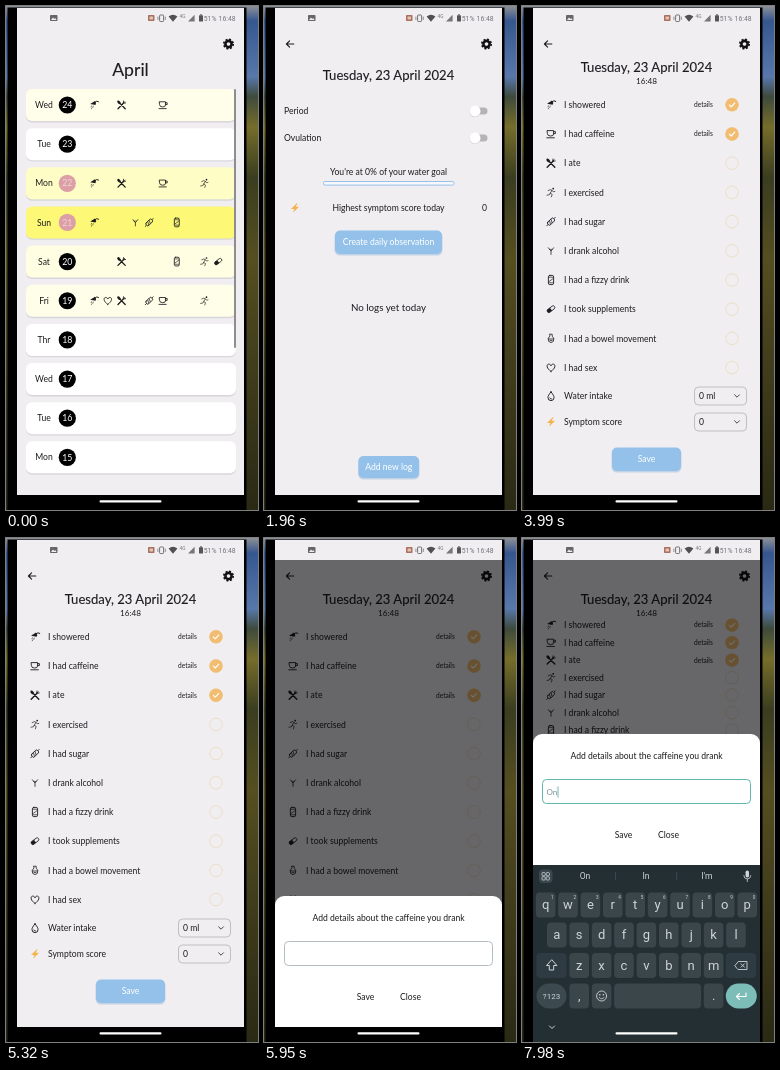
These frames come from a looping animation (252x504 px, 8000 ms). An HTML page:

```html
<!DOCTYPE html>
<html lang="en">
<head>
<meta charset="utf-8">
<title>Daily log</title>
<style>
@property --shrink { syntax: "<length>"; inherits: true; initial-value: 0px; }
html, body { margin: 0; width: 100%; height: 100%; overflow: hidden; background: #000; }
svg { display: block; width: 100vw; height: 100vh; }
text { font-family: Lato, sans-serif; fill: #1c1c1f; }
text.title { stroke: #1c1c1f; stroke-width: .12px; }
text.light { fill: #fff; }
text.key { font-family: Roboto, sans-serif; fill: #cfd5d8; }
text.status { font-family: Roboto, sans-serif; fill: #77757a; }
text.typed { fill: #7d9090; }
.line { fill: none; stroke: #1c1c1f; stroke-linecap: round; stroke-linejoin: round; }

.page { transform-origin: 124.5px 245.5px; }
#calendar, #day, #day-in, #log, #log-page, #dim, #sheet, #keyboard, #keys, #bar, #row-press, #add-press,
#focus, #caret, #typed-o, #typed-n, #words, #upper, #lower, .tick { animation: 8s linear infinite both; }
#calendar { animation-name: calendar; }
#bar { animation-name: bar; }
#row-press { animation-name: row-press; }
#day { animation-name: day-out; }
#day-in { animation-name: day-in; }
#log { animation-name: log-in; }
#add-press { animation-name: add-press; }
#log-page { animation-name: shrink; }
#dim { animation-name: dim; }
#sheet { animation-name: rise, shrink; }
#sheet > g { transform: translateY(calc(358px - var(--shrink))); }
#keyboard { animation-name: keyboard; }
#keys { animation-name: keys; }
#focus { animation-name: focus; }
#caret { animation-name: caret; animation-timing-function: step-end; }
#typed-o, #words, #lower { animation-name: first-letter; animation-timing-function: step-end; }
#upper { animation-name: upper; animation-timing-function: step-end; }
#typed-n { animation-name: second-letter; animation-timing-function: step-end; }
.row { transform: translateY(calc(69.6px + var(--i) * (29.2px - var(--shrink) * .0722))); }
#tick1 { animation-name: tick1; }
#tick2 { animation-name: tick2; }
#tick3 { animation-name: tick3; }

@keyframes bar { 0%, .8% { opacity: 1; } 4.4%, 100% { opacity: 0; } }
@keyframes row-press { 0%, 6% { opacity: 0; } 7.5% { opacity: .08; } 9.5%, 100% { opacity: 0; } }
@keyframes calendar {
  0%, 7.9% { transform: scale(1); animation-timing-function: ease-out; }
  10.5% { transform: scale(1.13); animation-timing-function: ease-out; }
  14%, 100% { transform: scale(1.15); }
}
@keyframes day-in {
  0%, 7.9% { transform: scale(.85); opacity: 0; animation-timing-function: ease-out; }
  9.6% { transform: scale(.97); opacity: 0; }
  10.5% { transform: scale(.985); opacity: .18; }
  12% { transform: scale(.997); opacity: 1; }
  13%, 100% { transform: scale(1); opacity: 1; }
}
@keyframes add-press { 0%, 26.5% { opacity: 0; } 27.6% { opacity: .12; } 30%, 100% { opacity: 0; } }
@keyframes day-out {
  0%, 27.8% { transform: scale(1); animation-timing-function: ease-out; }
  30%, 100% { transform: scale(1.14); }
}
@keyframes log-in {
  0%, 27.8% { transform: scale(.85); opacity: 0; animation-timing-function: ease-out; }
  29% { transform: scale(.97); opacity: 0; }
  30% { transform: scale(.988); opacity: .3; }
  31% { transform: scale(.998); opacity: 1; }
  31.6%, 100% { transform: scale(1); opacity: 1; }
}
@keyframes tick1 { 0%, 38.4% { opacity: 0; } 40.5%, 100% { opacity: 1; } }
@keyframes tick2 { 0%, 45.4% { opacity: 0; } 47.5%, 100% { opacity: 1; } }
@keyframes tick3 { 0%, 61.2% { opacity: 0; } 63.3%, 100% { opacity: 1; } }
@keyframes dim { 0%, 68.2% { opacity: 0; } 69.12% { opacity: .43; } 71%, 100% { opacity: .57; } }
@keyframes rise {
  0%, 68.25% { transform: translateY(131px); }
  69.12% { transform: translateY(122.5px); }
  70% { transform: translateY(72px); }
  70.9% { transform: translateY(28px); }
  71.8% { transform: translateY(7px); }
  72.6%, 100% { transform: translateY(0); }
}
@keyframes focus { 0%, 83% { stroke: #b4bcc4; } 85.75% { stroke: #8fa9c0; } 89%, 100% { stroke: #62b5ae; } }
@keyframes shrink {
  0%, 84.8% { --shrink: 0px; }
  85.75% { --shrink: 24px; }
  86.6% { --shrink: 105px; }
  87.5% { --shrink: 152px; }
  88.3%, 100% { --shrink: 162px; }
}
@keyframes keyboard {
  0%, 83.9% { transform: translateY(177px); }
  85.75% { transform: translateY(150px); }
  86.6% { transform: translateY(60px); }
  87.5% { transform: translateY(12px); }
  88.3%, 100% { transform: translateY(0); }
}
@keyframes keys { 0%, 85.8% { opacity: 0; } 86.6%, 100% { opacity: 1; } }
@keyframes caret {
  0% { opacity: 0; transform: none; }
  88.4% { opacity: 1; transform: none; }
  92.8% { opacity: 1; transform: translateX(6.3px); }
  98%, 100% { opacity: 1; transform: translateX(10.6px); }
}
@keyframes first-letter { 0% { opacity: 0; } 92.8%, 100% { opacity: 1; } }
@keyframes upper { 0% { opacity: 1; } 92.8%, 100% { opacity: 0; } }
@keyframes second-letter { 0% { opacity: 0; } 98%, 100% { opacity: 1; } }
</style>
</head>
<body>
<svg id="stage" viewBox="0 0 252 504" preserveAspectRatio="none"></svg>
<script>
const PAGE = '#f0eef1';
const BLUE = '#93c1ea';

const text = (x, y, value, { size = 8.6, anchor = 'start', cls = '', extra = '' } = {}) =>
  `<text x="${x}" y="${y + size * .36}" font-size="${size}" text-anchor="${anchor}" class="${cls}" ${extra}>${value}</text>`;
const middle = (x, y, value, options = {}) => text(x, y, value, { ...options, anchor: 'middle' });
const box = (x, y, w, h, r, fill, extra = '') =>
  `<rect x="${x}" y="${y}" width="${w}" height="${h}" rx="${r}" fill="${fill}" ${extra}/>`;
const disc = (x, y, r, fill, extra = '') => `<circle cx="${x}" cy="${y}" r="${r}" fill="${fill}" ${extra}/>`;
const line = (d, width = .8, extra = '') => `<path class="line" d="${d}" stroke-width="${width}" ${extra}/>`;
const solid = (d, fill = '#1c1c1f') => `<path d="${d}" fill="${fill}"/>`;
const at = (x, y, content, scale = 1) => `<g transform="translate(${x} ${y}) scale(${scale})">${content}</g>`;
const times = (n, fn) => Array.from({ length: n }, (_, i) => fn(i)).join('');

// Each icon is drawn around the origin, about ten pixels across.
const icons = {
  shower: solid('M-4-1L1-4.2Q3-2 1.6 0Z') + line('M1-3Q3-5 4.8-3.5', 1) + line('M-2.6 1L-3 2M-.8 1.2L-1.2 2.6M-2.4 3.2L-2.7 4', .6),
  heart: line('M0 3.8C-6-.2-4-4.2-1.6-3.4Q-.4-3 0-1.8Q.4-3 1.6-3.4C4-4.2 6-.2 0 3.8Z', .9),
  food: line('M-3.8 4L2.2-2.2M3.8 4L-2.2-2.2', 1.4) + line('M2-4.2L1.8-2L4.2-2.2M3.2-3.4L1.8-2', .9) +
    '<ellipse cx="-2.8" cy="-2.8" rx="1.4" ry="2.2" transform="rotate(-45 -2.8 -2.8)" fill="#1c1c1f"/>',
  alcohol: line('M-2.6-3L0 .2L2.6-3M0 .2V3.6', .8) + line('M-1.4-1.4H1', .6),
  sugar: `<g transform="rotate(-45)">${box(-4, -1.9, 8, 3.8, 1.4, 'none', 'class="line" stroke-width=".9"')}${line('M-2.2 1.4L-.6-1.4M0 1.4L1.6-1.4', .7)}</g>` +
    line('M-4.2 4.2L-3 3M4.2-4.2L3-3', .9),
  caffeine: line('M-3.6-3.4H2.6V0Q2.6 2-.4 2Q-3.6 2-3.6 0ZM2.6-2.4H4.4V-.4H2.6M-4.2 3.8H3.4', .9),
  fizzy: box(-2.6, -4.6, 5.2, 9.2, 1.4, 'none', 'class="line" stroke-width=".9"') + line('M-2-2.8H2M-2 2.8H2M-1.8 1.4L1.8-1.2', .7),
  exercise: disc(2.2, -3.8, .9, '#1c1c1f') + line('M-2.8-1.8L-.6-2.8L1-2L-.8.8L1.2 2L.4 4.4M-.8.8L-1.6 2.4L-4 2.8M1-2L2.2-.6L3.8-1', .7),
  supplement: `<g transform="rotate(-38)">${box(-4.4, -1.7, 8.8, 3.4, 1.7, 'none', 'class="line" stroke-width=".8"')}${solid('M0-1.7H-2.7A1.7 1.7 0 0 0-2.7 1.7H0Z')}</g>`,
  bowel: line('M-1.2-4.2H1.2V-2.2L2.8 0Q3.4 3.8 0 4.2Q-3.4 3.8-2.8 0L-1.2-2.2ZM-2.6.6H2.6M-1 2.2H1', .8),
  drop: line('M0-4.2Q3.4 0 3 1.6A3 3 0 0 1-3 1.6Q-3.4 0 0-4.2ZM-1.2 2Q-.8 3 .4 3', .95),
  bolt: solid('M1.8-4.8L-4 1H-.6L-2 4.8L4-1.2H.6L2.6-4.8Z', '#f4b24c'),
  gear: disc(0, 0, 3.1, 'none', 'stroke="#111" stroke-width="2.6"') +
    disc(0, 0, 4.7, 'none', 'stroke="#111" stroke-width="1.6" stroke-dasharray="2 1.69"'),
  back: line('M3.8 0H-3.6M-.4-3.2L-3.6 0L-.4 3.2', 1.1),
};

const header = back => (back ? at(26, 38, icons.back) : '') + at(222.5, 38, icons.gear);
const pageBack = box(11, 2, 227, 487, 0, PAGE);
const button = (x, y, w, h, label) => box(x - .5, y + .5, w + 1, h + 1, 5.5, '#c3d3e6') +
  box(x, y, w, h, 5, BLUE) + middle(x + w / 2, y + h / 2, label, { cls: 'light' });

function calendar() {
  const columns = ['shower', 'heart', 'food', 'alcohol', 'sugar', 'caffeine', 'fizzy', 'bowel', 'exercise', 'supplement'];
  const days = [
    ['Wed', '#fffeea', 'shower food caffeine'],
    ['Tue', '#fff', ''],
    ['Mon', '#fffdc6', 'shower food caffeine exercise', true],
    ['Sun', '#fdf977', 'shower alcohol sugar fizzy', true],
    ['Sat', '#fffee2', 'food fizzy exercise supplement'],
    ['Fri', '#fffee8', 'shower heart food sugar caffeine exercise'],
    ['Thr', '#fff', ''], ['Wed', '#fff', ''], ['Tue', '#fff', ''], ['Mon', '#fff', ''],
  ];
  const rows = days.map(([name, fill, marks, period], i) => {
    const y = 99 + i * 39.15;
    return box(20, y - 15, 210, 32.4, 6, '#d8d6da') + box(20, y - 16, 210, 32, 6, fill) +
      middle(38, y, name) + disc(61.3, y, 8.6, period ? '#dc9fa5' : '#000') +
      middle(61.3, y, 24 - i, { cls: 'light', size: 8.8, extra: period ? 'fill-opacity=".55"' : '' }) +
      marks.split(' ').filter(Boolean).map(m => at(88 + columns.indexOf(m) * 13.8, y, icons[m], .95)).join('');
  }).join('');
  return `<g id="calendar" class="page">${pageBack}${header(false)}${middle(124.5, 64, 'April', { size: 17.6, cls: 'title' })}${rows}
    ${box(20, 122, 210, 32, 6, '#000', 'id="row-press"')}${box(228, 83, 2, 259, 1, '#8e8e90', 'id="bar"')}</g>`;
}

function day() {
  const toggle = y => box(207, y - 3.6, 16.5, 7.2, 3.6, '#b5b3b6') +
    disc(211, y + .5, 5.6, '#d2d0d3') + disc(211, y, 5.4, '#fff');
  return `<g id="day" class="page"><g id="day-in" class="page">${pageBack}${header(true)}
    ${middle(124.5, 69.5, 'Tuesday, 23 April 2024', { size: 13.1, cls: 'title' })}
    ${text(20, 105, 'Period')}${toggle(105)}${text(20, 132, 'Ovulation')}${toggle(132)}
    ${middle(124.5, 166, "You're at 0% of your water goal")}
    ${box(59.5, 175.5, 130.5, 3.6, 1.5, '#f7f8fc', 'stroke="#8fbbe6" stroke-width=".9"')}
    ${at(31, 202, icons.bolt)}${middle(124.5, 202, 'Highest symptom score today')}${middle(220.5, 202, '0')}
    ${button(71, 224.5, 107, 23.5, 'Create daily observation')}
    ${middle(124.5, 301, 'No logs yet today', { size: 9.8 })}
    ${button(94.5, 450, 60.5, 22, 'Add new log')}${box(94.5, 450, 60.5, 22, 5, '#000', 'id="add-press"')}</g></g>`;
}

function log() {
  const entries = [
    ['shower', 'I showered'], ['caffeine', 'I had caffeine'], ['food', 'I ate'], ['exercise', 'I exercised'],
    ['sugar', 'I had sugar'], ['alcohol', 'I drank alcohol'], ['fizzy', 'I had a fizzy drink'],
    ['supplement', 'I took supplements'], ['bowel', 'I had a bowel movement'], ['heart', 'I had sex'],
  ];
  const tick = n => `<g id="tick${n}" class="tick">${text(172, 0, 'details', { size: 6.6 })}${disc(210, 0, 6.7, '#f3bd71')}
    ${line('M207.4.2L209.2 2L212.8-1.8', 1.1, 'style="stroke:#fff"')}</g>`;
  const rows = entries.map(([icon, label], i) => `<g class="row" style="--i:${i + 1}">${at(29, 0, icons[icon])}${text(42, 0, label)}
    ${disc(210, 0, 6.3, 'none', 'stroke="#e9dbbd" stroke-width=".8"')}${i < 3 ? tick(i + 1) : ''}</g>`).join('');
  const select = (y, icon, label, value) => at(29, y, icons[icon]) + text(42, y, label) +
    box(172.5, y - 9, 52, 18, 4, 'none', 'stroke="#b3b1b5" stroke-width=".8"') + text(177, y, value) +
    line(`M212.6 ${y - 1.2}L215 ${y + 1.2}L217.4 ${y - 1.2}`, .8);
  return `<g id="log" class="page"><g id="log-page">${pageBack}${header(true)}
    ${middle(124.5, 61, 'Tuesday, 23 April 2024', { size: 13.1, cls: 'title' })}${middle(124.5, 75, '16:48', { size: 8.2 })}
    ${rows}${select(390, 'drop', 'Water intake', '0 ml')}${select(416, 'bolt', 'Symptom score', '0')}
    ${button(90, 441.5, 69, 23.5, 'Save')}</g></g>`;
}

const sheet = () => `${box(11, 22, 227, 467, 0, '#000', 'id="dim"')}
  <g id="sheet"><g>${box(11, 0, 227, 330, 9, '#fff')}
  ${middle(124.5, 22, 'Add details about the caffeine you drank')}
  ${box(20.5, 45.5, 208, 24, 4, '#fff', 'id="focus" stroke-width="1"')}
  ${text(24.5, 58, 'O', { size: 8, cls: 'typed', extra: 'id="typed-o"' })}
  ${text(30.7, 58, 'n', { size: 8, cls: 'typed', extra: 'id="typed-n"' })}
  ${box(24.8, 52.5, .9, 11, 0, '#4fa9a4', 'id="caret"')}
  ${middle(101.5, 101, 'Save')}${middle(146.5, 101, 'Close')}</g></g>`;

function keyboard() {
  const pale = 'style="stroke:#cfd5d8"';
  const rows = [['qwertyuiop', 23.6, 367], ['asdfghjkl', 34.8, 397], ['zxcvbnm', 57.2, 427.5]];
  const each = fn => rows.map(([letters, x, y]) => [...letters].map((c, i) => fn(c, x + i * 22.4, y, i)).join('')).join('');
  const cap = (x, y, w, fill = '#3b464b', r = 4) => box(x - w / 2, y - 12.5, w, 25, r, fill);
  const letter = (c, x, y) => middle(x, y - .5, c, { cls: 'key', size: 13 });
  const digits = times(10, i => middle(30.4 + i * 22.4, 359, (i + 1) % 10, { cls: 'key', size: 4.6 }));
  return `<g id="keyboard">${box(11, 327, 227, 177, 0, '#242f34')}<g id="keys">
    ${box(17, 331.5, 13.5, 13.5, 4, '#3a474e')}
    ${times(4, i => box(20 + i % 2 * 4.2, 334.6 + (i >> 1) * 4.2, 3.2, 3.2, .8, 'none', 'stroke="#cfd5d8" stroke-width=".8"'))}
    <g id="words">${['On', 'In', "I'm"].map((w, i) => middle(63 + i * 61, 338, w, { cls: 'key', size: 8.6 })).join('')}
    ${box(93, 334, .6, 8, 0, '#4b585f')}${box(154.5, 334, .6, 8, 0, '#4b585f')}</g>
    ${box(223.6, 332.5, 3.4, 7, 1.7, '#cfd5d8')}${line('M221.8 337.5Q222 341 225.3 341Q228.6 341 228.8 337.5M225.3 341V343.6', .8, pale)}
    ${each((c, x, y) => cap(x, y, 19.6))}${digits}
    <g id="upper">${each((c, x, y) => letter(c.toUpperCase(), x, y))}</g><g id="lower">${each(letter)}</g>
    ${cap(29.5, 427.5, 30, '#2f3b42')}${line('M29.5 422L24.5 427.5H27.3V432H31.7V427.5H34.5Z', 1, pale)}
    ${cap(219, 427.5, 30, '#2f3b42')}${line('M213 427.5L216.4 423.5H225V431.5H216.4ZM219 425.8L222.4 429.2M222.4 425.8L219 429.2', .9, pale)}
    ${cap(29.5, 458, 30, '#3c4a50', 12.5)}${middle(29.5, 458, '?123', { cls: 'key', size: 8 })}
    ${cap(57.2, 458, 19.6)}${letter(',', 57.2, 458)}
    ${cap(79.6, 458, 19.6)}${disc(79.6, 458, 5, 'none', 'stroke="#cfd5d8" stroke-width=".9"')}
    ${disc(77.8, 456.8, .8, '#cfd5d8')}${disc(81.4, 456.8, .8, '#cfd5d8')}${line('M77.2 459.5Q79.6 462.4 82 459.5', .8, pale)}
    ${cap(135.6, 458, 87)}${cap(191.6, 458, 19.6)}${letter('.', 191.6, 458)}
    ${cap(219.3, 458, 31, '#7dbdb8', 12.5)}${line('M224 455V458.5H214.5M217.5 455.5L214.5 458.5L217.5 461.5', 1.1, 'style="stroke:#fff"')}
    ${line('M27.5 488L30 490.5L32.5 488', 1, pale)}</g></g>`;
}

const statusBar = () => `${box(44, 9, 7.5, 6, .8, '#666')}${solid('M45 14L47 11.4L48.4 13L49.2 12L50.6 14Z', PAGE)}
  ${box(142, 9, 6.5, 6, .8, '#a8705f')}${box(143.5, 10.6, 3.5, 2.8, .4, '#e6c4b4')}
  ${box(153.6, 9, 4, 6.5, .8, 'none', 'stroke="#666" stroke-width=".9"')}${line('M151.9 11V13.6M159.3 11V13.6', .7, 'style="stroke:#666"')}
  ${solid('M162.6 10.4Q167 7 171.4 10.4L167 15.8Z', '#505050')}
  ${text(173.5, 10.6, '4G', { size: 4.8, cls: 'status' })}${solid('M182 15.5H188.6V8.8Z', '#777')}
  ${box(193, 9.2, 4, 6.4, .6, '#555')}${box(194.1, 8.3, 1.8, 1, 0, '#555')}
  ${text(197.8, 12.3, '51%', { size: 6.8, cls: 'status' })}${text(212.6, 12.3, '16:48', { size: 6.8, cls: 'status' })}`;

const scenery = [[0, '#8d9096'], [.03, '#36568f'], [.14, '#5878ac'], [.18, '#3e4a3c'], [.24, '#766d2a'],
  [.34, '#3a3d20'], [.5, '#554e20'], [.72, '#403c1c'], [1, '#2a2914']];

document.getElementById('stage').innerHTML = `<defs>
  <linearGradient id="scenery" x2="0" y2="1">${scenery.map(([o, c]) => `<stop offset="${o}" stop-color="${c}"/>`).join('')}</linearGradient>
  <clipPath id="screen">${box(11, 2, 227, 487, 0, '#000')}</clipPath>
  <clipPath id="phone">${box(11, 0, 227, 504, 0, '#000')}</clipPath></defs>
  ${box(0, 0, 252, 504, 0, 'url(#scenery)')}${box(1.5, 1.5, 239, 502.5, 0, '#000')}
  <g clip-path="url(#screen)">${calendar()}${day()}${log()}${sheet()}</g>
  <g clip-path="url(#phone)">${keyboard()}</g>
  ${statusBar()}${box(93.5, 494.3, 62, 2.2, 1.1, '#fff')}`;
</script>
</body>
</html>
```
